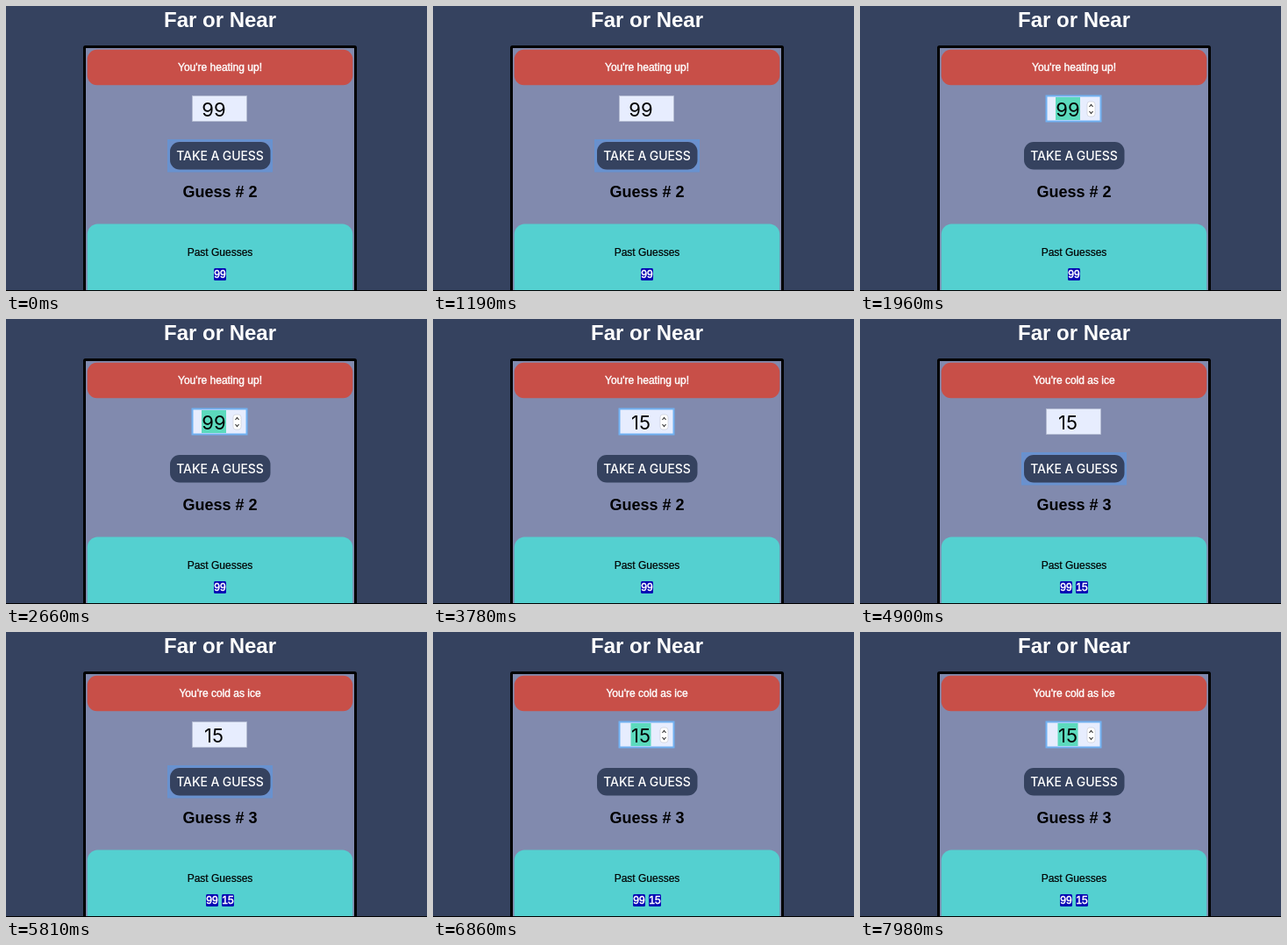
An HTML page that plays this animation: 480x325 px, repeating every 8000 ms.

```html
<!DOCTYPE html>
<html lang="en">
<head>
<meta charset="utf-8">
<title>Guessing game</title>
<style>
  html, body { margin: 0; width: 100%; height: 100%; overflow: hidden; background: #35425f; }
  svg { display: block; width: 100%; height: 100%; }
  text { font: 12px "Liberation Sans", Arial, sans-serif; text-anchor: middle; }
  .title { font-size: 24px; font-weight: bold; fill: #fff; }
  .count { font-size: 18px; font-weight: bold; }
  .message { fill: #fff; stroke: #fff; stroke-width: .4; }
  .past { stroke: #000; stroke-width: .2; }
  .badge text { fill: #fff; stroke: #fff; stroke-width: .5; }
  .badge rect { fill: #0808b4; }
  .value { font: 22px Inter, sans-serif; }
  .label { font: 500 14px Inter, sans-serif; letter-spacing: -.1px; }
</style>
</head>
<body>
<svg viewBox="0 0 480 325">
  <rect width="480" height="325" fill="#35425f"/>
  <text class="title" x="244" y="24">Far or Near</text>
  <rect x="89.5" y="46.5" width="309" height="300" rx="1" fill="#818aae" stroke="#000" stroke-width="3"/>

  <rect x="92.7" y="49.7" width="302.6" height="40.6" rx="11" fill="#c84f48"/>
  <text class="message" id="message" x="244" y="74"></text>

  <rect id="field" x="212.5" y="102.5" width="62" height="29" fill="#e7edfe"/>
  <rect id="selection" y="104" height="26" fill="#5cdabd"/>
  <text class="value" id="value" x="237" y="125.5"></text>
  <path id="caret" d="M251.5 106V128" stroke="#000"/>
  <g id="spinner">
    <rect x="259" y="109" width="9" height="17" rx="3" fill="#fff" stroke="#c3c7d2" stroke-width=".6"/>
    <path d="M261.5 115l2-2.5 2 2.5M261.5 120l2 2.5 2-2.5" fill="none" stroke="#333" stroke-width="1.1"/>
  </g>

  <rect id="ring" x="185" y="153" width="118" height="35.5"/>
  <rect id="button" x="187" y="155" width="114.5" height="31.5" rx="11"/>
  <text class="label" id="label" x="244" y="176">TAKE A GUESS</text>
  <text class="count" id="count" x="244" y="218"></text>

  <rect x="92.7" y="248.6" width="302.6" height="90" rx="12" fill="#54d0d0"/>
  <text class="past" x="244" y="285">Past Guesses</text>
  <g class="badge" id="first"><rect x="-7" y="299" width="14" height="14" rx="1.5"/><text y="310">99</text></g>
  <g class="badge" id="second"><rect x="-7" y="299" width="14" height="14" rx="1.5"/><text y="310">15</text></g>
  <rect y="324" width="480" height="1"/>
</svg>
<script>
const LOOP = 8000;
const HOVER = 4000, PRESS = 4410, LEAVE = 4560;
const ui = {};
document.querySelectorAll("[id]").forEach(el => ui[el.id] = el);

const set = (el, attrs) => {
  for (const key in attrs) el.setAttribute(key, attrs[key]);
};
const show = (el, on) => set(el, { visibility: on ? "visible" : "hidden" });
const ramp = (t, start, length) => {
  const p = Math.min(1, Math.max(0, (t - start) / length));
  return p * p * (3 - 2 * p);
};
const mix = (a, b, p) => `rgb(${a.map((v, i) => Math.round(v + (b[i] - v) * p))})`;

function draw(t) {
  const guessed = t >= PRESS;
  const typing = t >= 3150 && t < PRESS;
  const selected = (t >= 1680 && t < 3150) || t >= 6160;
  const focused = selected || typing;
  const value = t < 3150 ? "99" : t < 3360 ? "1" : "15";

  ui.message.textContent = guessed ? "You're cold as ice" : "You're heating up!";
  ui.count.textContent = "Guess # " + (guessed ? 3 : 2);
  ui.value.textContent = value;

  set(ui.field, { stroke: focused ? "#71b1f2" : "#b6bdd2", "stroke-width": focused ? 2 : .7 });
  const width = value === "99" ? 28 : 23;
  set(ui.selection, { x: 237 - width / 2, width });
  show(ui.selection, selected);
  show(ui.caret, typing && t % 1000 < 500);
  show(ui.spinner, focused);

  const heat = ramp(t, HOVER, 300) * (1 - ramp(t, LEAVE, 300));
  set(ui.button, { fill: mix([53, 66, 95], [130, 82, 66], heat) });
  set(ui.label, { fill: mix([255, 255, 255], [238, 232, 198], heat) });

  const pressed = guessed && t < LEAVE;
  set(ui.ring, {
    fill: pressed ? "none" : "#6c90cc",
    stroke: pressed ? "#a5a8b7" : "#6792d0",
    "stroke-width": pressed ? 1 : 2,
    "stroke-dasharray": pressed ? "1.5 1" : "none"
  });
  show(ui.ring, !focused);

  set(ui.first, { transform: `translate(${guessed ? 235 : 244} 0)` });
  set(ui.second, { transform: "translate(253 0)" });
  show(ui.second, guessed);
}

const start = performance.now();
function tick() {
  draw((performance.now() - start) % LOOP);
  requestAnimationFrame(tick);
}
tick();
</script>
</body>
</html>
```
